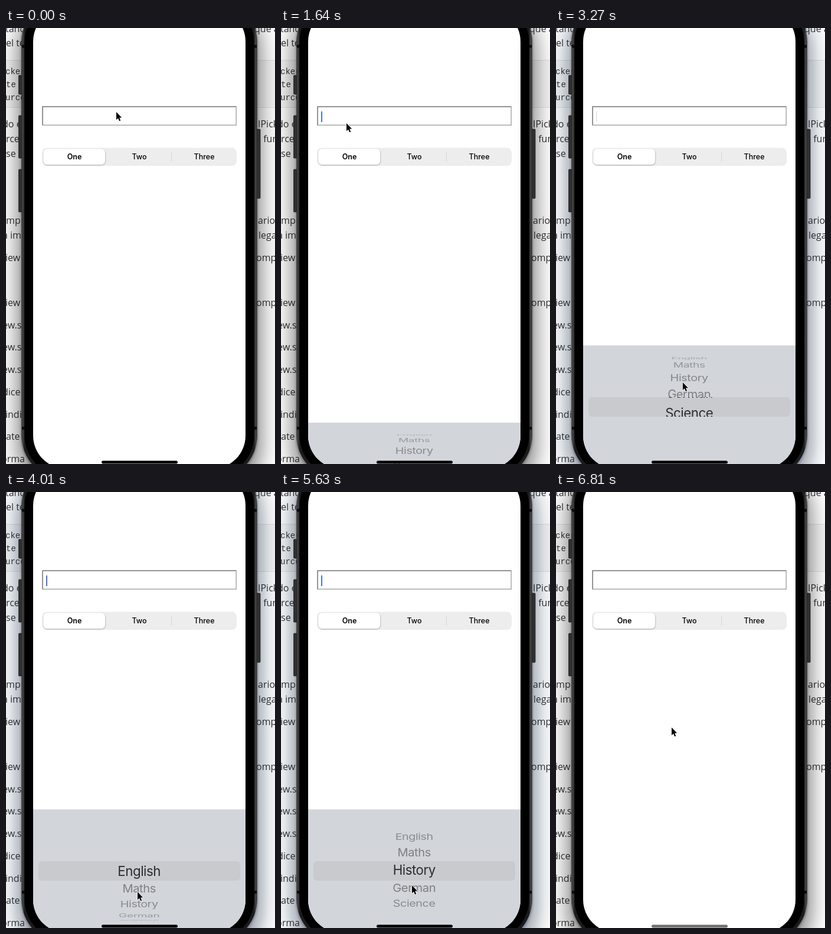
An HTML page for the animation above (6.96 s loop, 456x737 px).

```html
<!DOCTYPE html>
<html lang="es">
<head>
<meta charset="utf-8">
<title>Picker demo</title>
<style>
  html, body { margin: 0; width: 100%; height: 100%; overflow: hidden; background: #fff; }
  svg { display: block; width: 456px; height: 737px; }
  #page { font: 16px "Open Sans", "Noto Sans", sans-serif; fill: #333; white-space: pre; }
  #page .code { font: 14px "Courier New", "Liberation Mono", monospace; }
  .ui { font-family: Inter, Roboto, sans-serif; text-anchor: middle; }
  #tabs { font-size: 12.5px; font-weight: 500; }
  #picker { font-size: 20.3px; letter-spacing: -.45px; }
</style>
</head>
<body>
<svg viewBox="0 0 456 737">
  <defs>
    <filter id="blur" x="-30%" y="-20%" width="160%" height="140%"><feGaussianBlur stdDeviation="18"/></filter>
    <filter id="contact" x="-5%" y="-5%" width="110%" height="110%"><feGaussianBlur stdDeviation="2"/></filter>
    <filter id="soft" x="-20%" y="-30%" width="140%" height="170%"><feDropShadow dx=".4" dy="1" stdDeviation="1" flood-opacity=".3"/></filter>
    <linearGradient id="rim">
      <stop offset="0" stop-color="#222"/><stop offset=".005" stop-color="#4a4a4a"/>
      <stop offset=".013" stop-color="#1c1c1c"/><stop offset=".987" stop-color="#1c1c1c"/>
      <stop offset=".995" stop-color="#4a4a4a"/><stop offset="1" stop-color="#222"/>
    </linearGradient>
    <clipPath id="screen"><rect x="46" y="-33" width="360" height="778" rx="56"/></clipPath>
    <clipPath id="inBand"><rect x="55" y="624" width="342" height="33"/></clipPath>
    <clipPath id="outBand"><path d="M46 536H406V624H46ZM46 657H406V760H46Z"/></clipPath>
  </defs>

  <rect width="456" height="737" fill="#fff"/>
  <rect x="-2" y="54.5" width="460" height="80" fill="#f6f6f6" stroke="#e2e2e2"/>
  <g id="page"></g>
  <g id="shadow">
    <rect x="20" y="-35" width="412" height="815" rx="70" opacity=".5" filter="url(#blur)"/>
    <rect x="26" y="-51" width="400" height="816" rx="74" opacity=".4" filter="url(#contact)"/>
  </g>

  <g fill="#303030" stroke="#181818" stroke-width=".8">
    <rect x="21.5" y="80" width="6" height="32" rx="1"/>
    <rect x="21.5" y="148" width="6" height="72" rx="1"/>
    <rect x="21.5" y="239" width="6" height="72" rx="1"/>
    <rect x="425" y="171" width="6" height="117" rx="1"/>
  </g>
  <rect x="26.3" y="-51" width="399.4" height="814" rx="74" fill="url(#rim)"/>
  <path d="M27 31h5M420 31h5M27 676.5h5M420 676.5h5" stroke="#0c0c0c" stroke-width="5"/>
  <rect x="31.5" y="-46.5" width="389" height="805" rx="69.5"/>

  <g clip-path="url(#screen)">
    <rect x="46" y="-33" width="360" height="790" fill="#fff"/>
    <rect x="62" y="133" width="328.2" height="31.2" fill="#fff" stroke="#9c9c9c" stroke-width="1.3"/>
    <path d="M62 164V133H390" fill="none" stroke="#858585" stroke-width="1.5"/>
    <rect id="caret" x="68" y="141" width="2" height="18"/>
    <g id="tabs" class="ui">
      <rect x="61" y="202.5" width="330" height="30.5" rx="8" fill="#ededee"/>
      <rect x="63.5" y="204.5" width="104.5" height="26.5" rx="6.5" fill="#fff" filter="url(#soft)"/>
      <path d="M280.5 210V226" stroke="#d6d6d8"/>
      <text x="116" y="222" font-weight="600">One</text>
      <text x="226" y="222">Two</text>
      <text x="336" y="222">Three</text>
    </g>
    <g id="picker" class="ui">
      <rect x="46" y="536.5" width="360" height="230" fill="#d2d5da"/>
      <rect x="55" y="624" width="342" height="33" rx="6" fill="#c9cace"/>
      <g id="far" clip-path="url(#outBand)"></g>
      <g id="near" clip-path="url(#inBand)" fill="#2b2c2e"></g>
    </g>
    <rect id="home" x="162" y="731.5" width="129" height="5" rx="2.5"/>
  </g>
  <path id="cursor" d="M0 0V13.2L3 10.4 5.1 15.3 7.2 14.4 5.2 9.6H9.2Z" stroke="#fff" stroke-width="1.5" stroke-linejoin="round" paint-order="stroke"/>
</svg>

<script>
const LOOP = 6960, STEP = 148;
const $ = id => document.getElementById(id);

function addText(parent, text, x = 0, y = 0, cls = '') {
  const el = document.createElementNS('http://www.w3.org/2000/svg', 'text');
  el.textContent = text;
  el.setAttribute('x', x);
  el.setAttribute('y', y);
  if (cls) el.setAttribute('class', cls);
  return $(parent).appendChild(el);
}

// Page behind the phone: text, x, baseline
[['tanc', -1, 7], ['el te', 0, 31], ['do e', -6, 168], ['rce', 0, 193], ['se c', 0, 218],
 ['mp', 0, 331], ['n im', -7, 356], ['iew', -1, 394], ['iew', -1, 470],
 ['ew.s', -6, 508], ['ew.s', -6, 545], ['ew.s', -6, 583], ['dice', -6, 621],
 ['indi', -1, 659], ['ate', 0, 696], ['orma', -8, 734],
 ['que a', 421, 7], ['IPick', 427, 168], ['e fun', 423, 193], ['ario', 427, 331],
 ['lega', 428, 356], ['ompo', 424, 394], ['ompo', 424, 470]
].forEach(line => addText('page', ...line));
[['cker', -1, 78], ['te', 0, 100], ['urce', -1, 122]].forEach(line => addText('page', ...line, 'code'));

const rows = ['English', 'Maths', 'History', 'German', 'Science']
  .map(name => ({ far: addText('far', name, 0, 7.3), near: addText('near', name, 0, 7.3) }));

// Keys: time, values...
const cursorKeys = [
  [0, 187, 142], [1036, 111, 161], [2368, 111, 161], [2664, 170, 586], [2812, 170, 586],
  [3108, 212, 572], [3552, 223, 676], [4144, 223, 676], [4588, 221, 572], [5180, 221, 572],
  [5624, 222, 665], [5772, 220, 660], [6364, 196, 398], [LOOP, 196, 398]];
const scrollKeys = [[0, 4], [3108, 4], [3996, 0], [4144, 0], [4884, 4], [5180, 4], [5920, 1], [LOOP, 1]];

const clamp = u => Math.min(1, Math.max(0, u));
const easeOut = (t, start, length) => 1 - (1 - clamp((t - start) / length)) ** 3;

function sample(keys, t) {
  const i = Math.max(1, keys.findIndex(k => k[0] >= t));
  const [t0, ...a] = keys[i - 1], [t1, ...b] = keys[i];
  const u = (t - t0) / (t1 - t0), s = u * u * (3 - 2 * u);
  return a.map((v, n) => v + (b[n] - v) * s);
}

// Rows sit on a cylinder; the band shows a magnified copy
function drawWheel(pos) {
  const radius = 83.7, pitch = Math.acos(.933);
  rows.forEach((row, i) => {
    const angle = (i - pos) * pitch, depth = Math.cos(angle);
    const place = (el, zoom) => {
      const sx = zoom / (1 + .11 * (1 - depth));
      const y = 640.5 + zoom * radius * Math.sin(angle);
      el.setAttribute('transform', `translate(225.7 ${y}) scale(${sx} ${zoom * Math.max(depth, .01)})`);
      el.setAttribute('visibility', depth > .02 ? 'visible' : 'hidden');
    };
    place(row.far, 1);
    place(row.near, 1.1);
    row.far.setAttribute('opacity', .42 * (.35 + .65 * Math.max(depth, 0)));
  });
}

function draw(t) {
  const rise = easeOut(t, 1570, 400) - easeOut(t, 6480, 320);
  $('picker').setAttribute('transform', `translate(0 ${(1 - rise) * 209})`);
  $('shadow').setAttribute('fill', rise > .6 ? '#0a1c34' : '#000');
  $('home').setAttribute('fill', t > 6750 ? '#707070' : '#000');
  drawWheel(sample(scrollKeys, t)[0]);

  const dim = (t + 860) % 1000 < 420;
  $('caret').setAttribute('visibility', t > 1300 && t < 6600 ? 'visible' : 'hidden');
  $('caret').setAttribute('fill', dim ? '#dcdce0' : '#4a72d8');
  $('caret').setAttribute('width', dim ? 1.3 : 2);

  $('cursor').setAttribute('transform', `translate(${sample(cursorKeys, t)})`);
}

const begin = performance.now();
function tick() {
  const t = (performance.now() - begin) % LOOP;
  draw(Math.min(46, Math.floor((t + 10) / STEP)) * STEP);
  requestAnimationFrame(tick);
}
tick();
</script>
</body>
</html>
```
